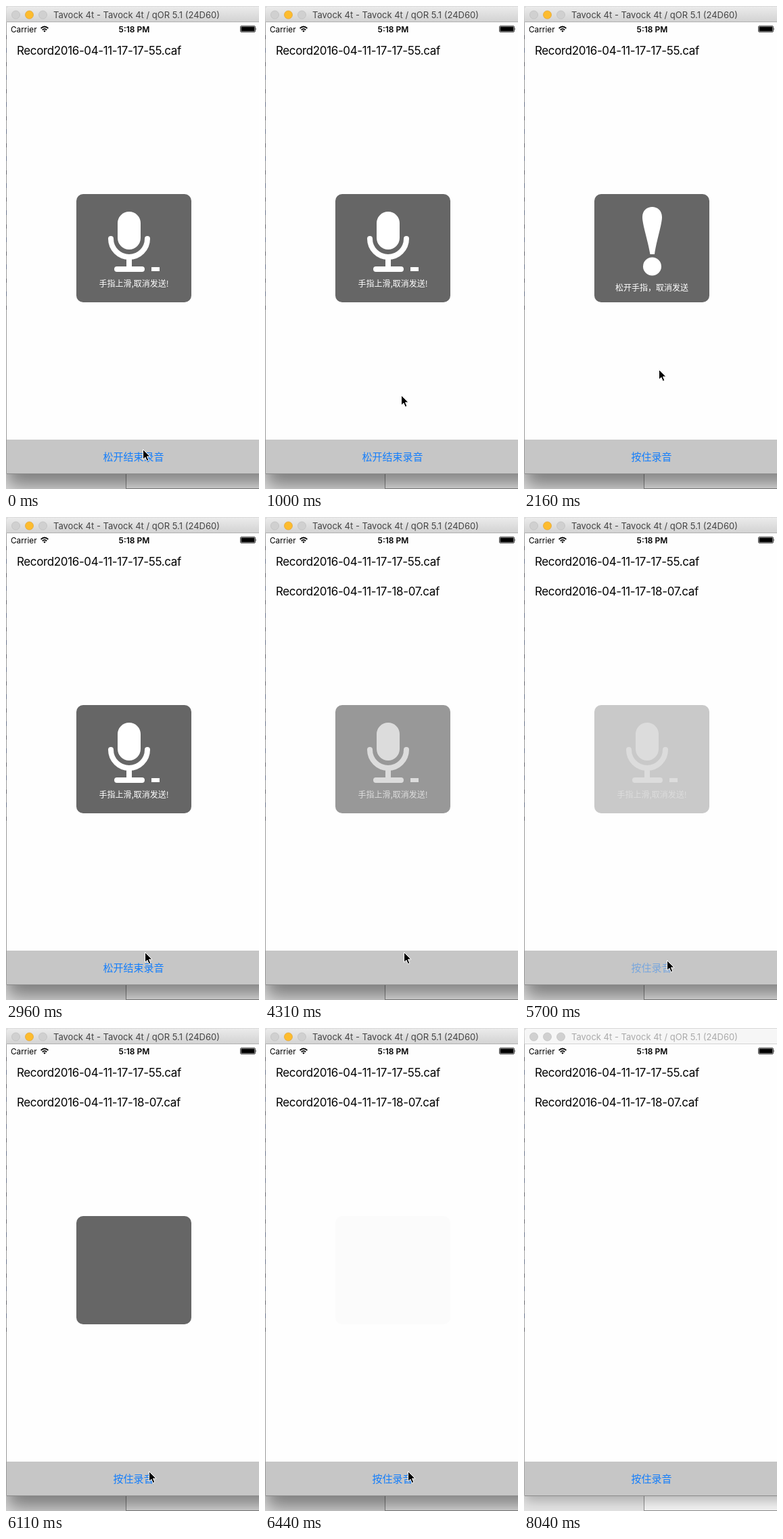
These frames come from a looping animation (374 by 714 pixels, 8070 ms). An HTML page:

```html
<!DOCTYPE html>
<html lang="zh">
<head>
<meta charset="utf-8">
<style>
html, body { margin: 0; width: 100%; height: 100%; overflow: hidden; background: #e3e3e3; }
#stage { position: absolute; width: 374px; height: 714px; overflow: hidden; }
#stage > * { position: absolute; left: 0; top: 0; }
#back { left: 177px !important; top: 600px !important; width: 220px; height: 113px; background: #f2f2f2; border: solid #8d8d8d; border-width: 0 0 1px 1px; }
#window { left: 1px !important; top: 1px !important; width: 430px; height: 691px; border-radius: 5px 0 0 0; background: #fefefe; }
#specks { top: 40px !important; width: 1px; height: 412px; opacity: .75;
  background: repeating-linear-gradient(#0000 0 3px, #223 3px 9px, #0000 9px 20px, #0000 20px 22px, #334d8c 22px 29px, #0000 29px 40px); }
text { font-family: Inter, sans-serif; }
.cjk { font-family: "Noto Sans CJK SC", "Noto Sans CJK", sans-serif; text-anchor: middle; }
.row { font-size: 17px; letter-spacing: -.37px; fill: #000; }
</style>
</head>
<body>
<div id="stage">
  <div id="back"></div>
  <div id="window"></div>
  <div id="specks"></div>
  <svg width="374" height="714">
    <defs>
      <linearGradient id="chrome" x2="0" y2="1">
        <stop stop-color="#ebebeb"/><stop offset="1" stop-color="#d2d2d2"/>
      </linearGradient>
    </defs>

    <path id="bar" d="M1 24V6q0-5 5-5H374V24Z"/>
    <path id="barLine" d="M1 23.5H374"/>
    <g id="lights"><circle cx="14.5" cy="13" r="6"/><circle cx="34.5" cy="13" r="6"/><circle cx="54.5" cy="13" r="6"/></g>
    <text id="title" x="70" y="18" font-size="13">Tavock 4t - Tavock 4t / qOR 5.1 (24D60)</text>

    <text x="7" y="38.5" font-size="11.8">Carrier</text>
    <g fill="none" stroke="#000" stroke-width="1.8">
      <path d="M51.6 33q5.400-5 10.800 0M53.700 35.400q3.300-3 6.600 0"/>
      <path d="M55.200 36.800q1.800-1.500 3.600 0L57 38.700Z" fill="#000" stroke="none"/>
    </g>
    <text x="189.500" y="38.500" font-size="12" font-weight="600" text-anchor="middle">5:18 PM</text>
    <rect x="346.500" y="29.500" width="22" height="9" rx="1.500" fill="none" stroke="#000" stroke-width=".7"/>
    <rect x="347.500" y="30.500" width="20" height="7" rx=".5"/>
    <path d="M369.500 32.500q1.500 1.500 0 3Z"/>

    <text class="row" x="16" y="71.500">Record2016-04-11-17-17-55.caf</text>
    <text class="row" id="newRow" x="16" y="115.500">Record2016-04-11-17-18-07.caf</text>

    <rect x="1" y="641" width="373" height="50" fill="#c6c6c6"/>
    <path d="M1 691.500H374" stroke="#8b8b8b"/>
    <path id="edge" d="M.5 24V691" stroke="#858585" opacity=".5"/>
    <text class="cjk" id="button" x="188.500" y="672" font-size="15" fill="#147efb"></text>

    <rect id="panel" x="104" y="278" width="170" height="160" rx="10" fill="#666"/>
    <g id="mic" fill="#fff">
      <rect x="165" y="304" width="34" height="56" rx="17"/>
      <path d="M155 344a27 27 0 0 0 54 0M182 371V388M164 389H201" fill="none" stroke="#fff" stroke-width="8" stroke-linecap="round"/>
      <rect x="215" y="386" width="12" height="6"/>
      <text class="cjk" x="189" y="415" font-size="12">手指上滑,取消发送!</text>
    </g>
    <g id="warning" fill="#fff">
      <path d="M175 312C175 292 204 292 204 312C204 323 196 346 193 367H186.500C183 346 175 323 175 312Z"/>
      <circle cx="189.500" cy="385" r="13.500"/>
      <text class="cjk" x="189" y="421" font-size="12">松开手指，取消发送</text>
    </g>

    <path id="cursor" d="M.5.500V15.200L3.900 12L6.300 17.600L8.900 16.500L6.500 11H11Z" stroke="#fff" stroke-width="1"/>
  </svg>
</div>
<script>
const LOOP = 8070, INACTIVE = 8040;
const HOLD = '按住录音', RELEASE = '松开结束录音';
const EXIT = 1030, ENTER = 2460, SAVE = 4110, TAP = 5560, TAP_END = 5710, DISMISS = 6250;

// time, x, y
const cursorPath = [
  [0, 202, 655], [440, 202, 655], [EXIT, 201, 571], [1220, 200, 549], [1690, 199, 526],
  [1870, 199, 526], [2160, 199, 537], [ENTER, 201, 571], [2650, 203, 607], [2960, 205, 643],
  [4920, 205, 643], [5090, 211, 655], [7220, 211, 655], [7480, 313, 716], [LOOP, 313, 716]
];
// start, duration, old title, new title
const titleChanges = [
  [-1000, 400, HOLD, RELEASE], [EXIT, 410, RELEASE, HOLD], [ENTER, 410, HOLD, RELEASE],
  [SAVE, 400, RELEASE, HOLD], [TAP, 550, HOLD, HOLD]
];

const el = id => document.getElementById(id);
const clamp = v => Math.max(0, Math.min(1, v));
const progress = (t, start, duration) => clamp((t - start) / duration);
const fadeOut = p => 1 - p ** 1.6;
const set = (id, attributes) => {
  for (const name in attributes) el(id).setAttribute(name, attributes[name]);
};

function cursorAt(t) {
  const i = cursorPath.findIndex(key => key[0] > t);
  const [t0, x0, y0] = cursorPath[i - 1], [t1, x1, y1] = cursorPath[i];
  const p = (t - t0) / (t1 - t0);
  return [x0 + (x1 - x0) * p, y0 + (y1 - y0) * p].map(Math.round);
}

function panelOpacity(t) {
  if (t < TAP) return fadeOut(progress(t, SAVE, 400));
  if (t < DISMISS) return progress(t, TAP, 400);
  return t < INACTIVE ? Math.max(.015, fadeOut(progress(t, DISMISS, 190))) : 0;
}

function drawTitle(t) {
  const [start, duration, before, after] = titleChanges.findLast(change => change[0] <= t);
  const p = progress(t, start, duration);
  el('button').textContent = p < .5 ? before : after;
  set('button', { opacity: clamp((Math.abs(p - .5) - .05) / .45) });
}

function drawWindow(active) {
  set('bar', { fill: active ? 'url(#chrome)' : '#f6f6f6' });
  set('barLine', { stroke: active ? '#b1b1b1' : '#d3d3d3' });
  set('title', { fill: active ? '#444' : '#aaa' });
  [...el('lights').children].forEach((light, i) => {
    const amber = active && i === 1;
    light.setAttribute('fill', amber ? '#fdbc2e' : '#d0d0d0');
    light.setAttribute('stroke', amber ? '#e0a132' : '#bdbdbd');
    light.setAttribute('stroke-width', .7);
  });
  el('window').style.boxShadow = active
    ? '0 18px 28px rgba(0,0,0,.45)'
    : '0 7px 18px rgba(0,0,0,.25)';
}

function draw(t) {
  const opacity = panelOpacity(t);
  const cancelling = t >= EXIT && t < ENTER;
  const blank = t >= TAP_END;
  set('panel', { opacity });
  set('mic', { opacity: cancelling || blank ? 0 : opacity });
  set('warning', { opacity: cancelling ? opacity : 0 });
  set('newRow', { opacity: t >= SAVE ? 1 : 0 });
  set('cursor', { transform: `translate(${cursorAt(t)})`, opacity: t < INACTIVE ? 1 : 0 });
  drawTitle(t);
  drawWindow(t < INACTIVE);
}

const begin = performance.now();
function tick() {
  draw((performance.now() - begin) % LOOP);
  requestAnimationFrame(tick);
}
tick();
</script>
</body>
</html>
```
